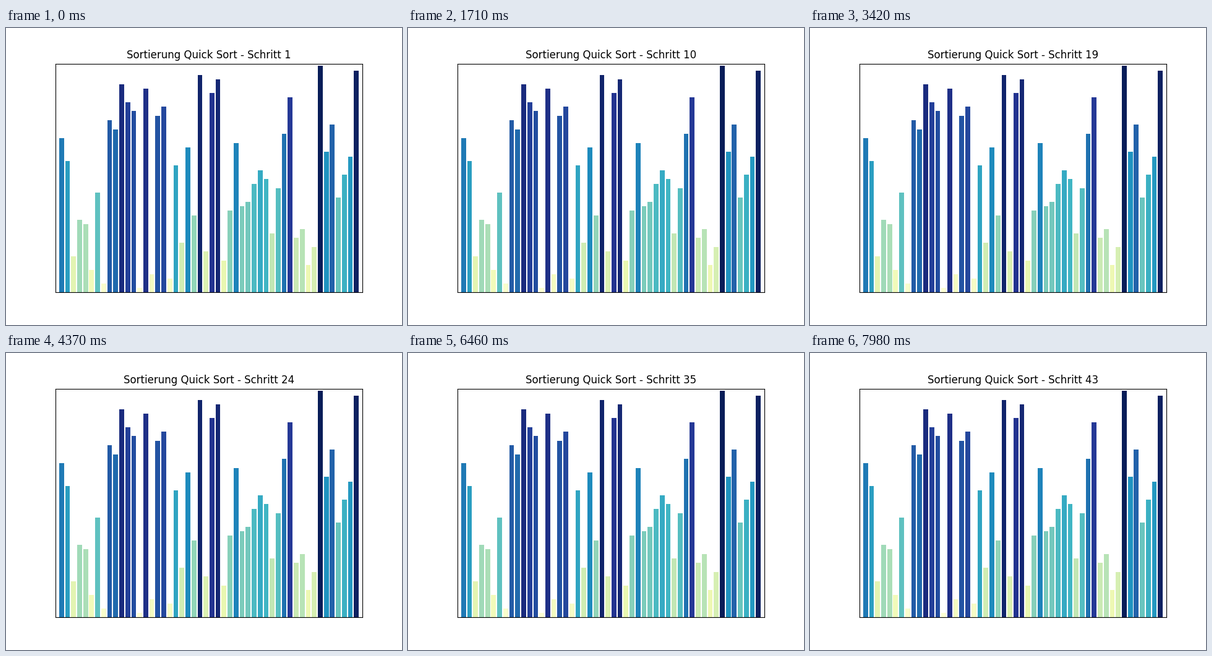
These frames come from a looping animation (640 px wide and 480 px high, 8 s). A matplotlib script:

```python
import matplotlib.pyplot as plt
import numpy as np
from matplotlib.animation import FuncAnimation

LOOP_MS = 8000
TICK_MS = 20
STEP_MS = 190

# The unsorted input: each height from 1 to 50 once, in no regular order.
HEIGHTS = [
    34, 29, 8, 16, 15, 5, 22, 2, 38, 36, 46, 42, 40, 1, 45, 4, 39,
    41, 3, 28, 11, 32, 17, 48, 9, 44, 47, 7, 18, 33, 19, 20, 24, 27,
    25, 13, 23, 35, 43, 12, 14, 6, 10, 50, 31, 37, 21, 26, 30, 49,
]


def step_at(ms):
    return int(ms // STEP_MS) + 1


def draw_bars(ax, heights):
    count, peak = len(heights), max(heights)
    colors = plt.cm.YlGnBu(np.array(heights) / peak)
    ax.bar(range(count), heights, color=colors)
    ax.set(xlim=(-1, count), ylim=(0, peak * 1.01), xticks=[], yticks=[])


def update(frame):
    # Sampling mid-tick keeps odd multiples of STEP_MS on time.
    step = step_at((frame + 0.5) * TICK_MS)
    title.set_text(f"Sortierung Quick Sort - Schritt {step}")
    return [title]


fig, ax = plt.subplots(figsize=(6.4, 4.8), dpi=100)
draw_bars(ax, HEIGHTS)
title = ax.set_title("")

anim = FuncAnimation(fig, update, frames=LOOP_MS // TICK_MS,
                     interval=TICK_MS, repeat=True)
plt.show()
```
